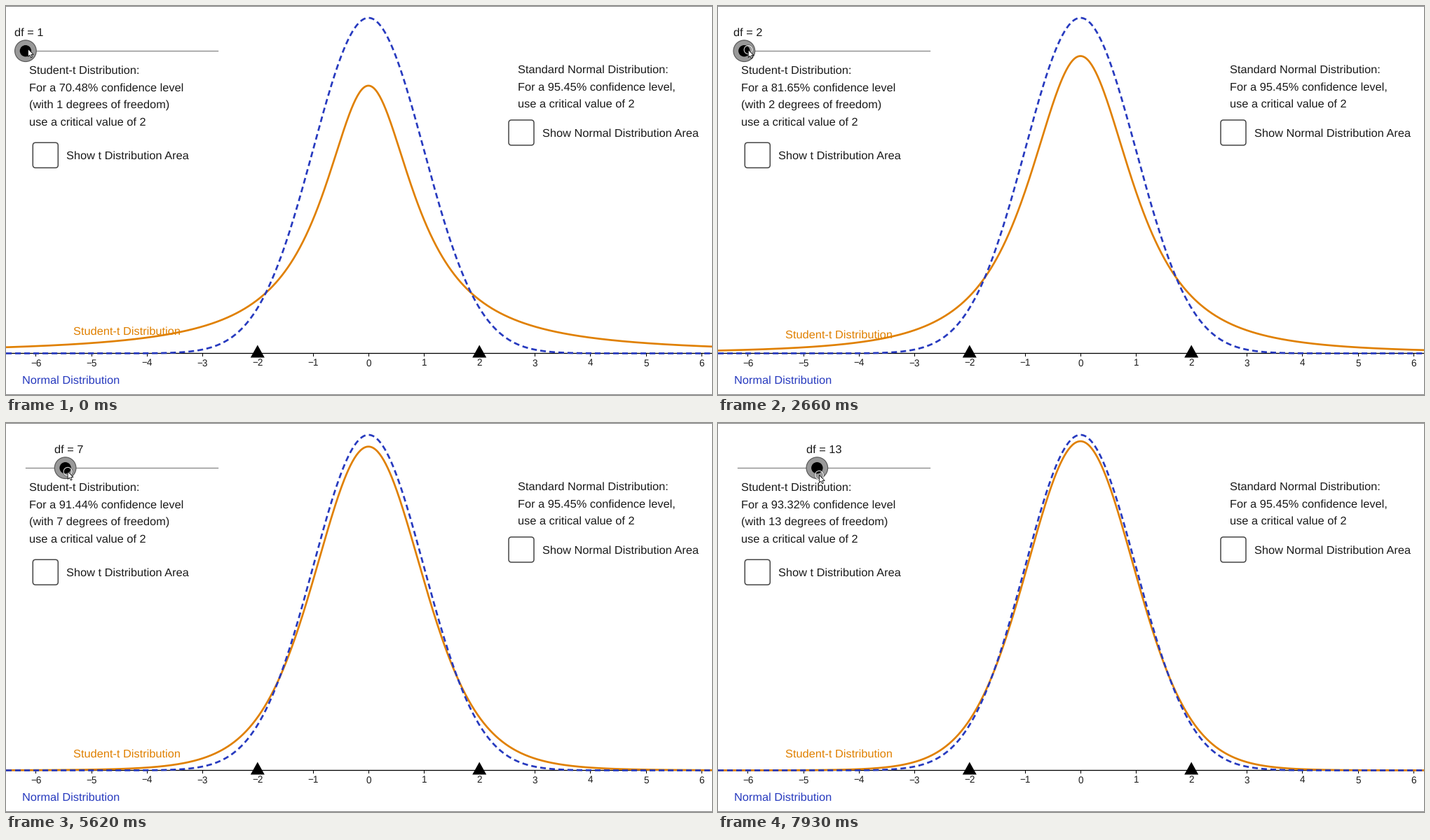
A matplotlib script for the animation above (8000 ms loop, 1007x556 px).

```python
import math

import numpy as np
import matplotlib.pyplot as plt
from matplotlib.animation import FuncAnimation
from matplotlib.patches import Circle, FancyBboxPatch, Polygon

W, H, DPI = 1007, 556, 72
LOOP, STEP = 8000, 40

X0, Y0 = 517.0, 496.5      # pixel position of the plot's zero point
UX, UY = 79.1, 1202.0      # pixels per unit
ORANGE, BLUE, INK = "#e08000", "#273abf", "#1a1a1a"

plt.rcParams["font.family"] = "Liberation Sans"
plt.rcParams["text.hinting"] = "no_hinting"
fig = plt.figure(figsize=((W + 0.01) / DPI, (H + 0.01) / DPI), dpi=DPI,
                 facecolor="white")
ax = fig.add_axes([0, 0, 1, 1])
ax.set_xlim(0, W)
ax.set_ylim(H, 0)
ax.axis("off")


def label(x, y, s, color=INK, size=16.35, **kw):
    return ax.text(x, y, s, color=color, fontsize=size, va="baseline", **kw)


def paragraph(x, y, lines):
    return [label(x, y + 24.5 * k, s) for k, s in enumerate(lines)]


def checkbox(x, y, text):
    ax.add_patch(FancyBboxPatch((x + 4, y + 4), 28, 28, fc="white", ec="#444444",
                                lw=1.5, boxstyle="round,pad=4,rounding_size=4"))
    label(x + 48, y + 23.5, text)


def normal_pdf(x):
    return np.exp(-x * x / 2) / math.sqrt(2 * math.pi)


def t_pdf(x, df):
    c = math.gamma((df + 1) / 2) / math.gamma(df / 2) / math.sqrt(df * math.pi)
    return c * (1 + x * x / df) ** (-(df + 1) / 2)


def confidence(df, crit=2, n=4000):
    mid = -crit + (np.arange(n) + 0.5) * 2 * crit / n
    return 100 * 2 * crit * t_pdf(mid, df).mean()


# Plot
px = np.linspace(0, W, 700)
xs = (px - X0) / UX

ax.plot([0, W], [Y0, Y0], color="black", lw=1.3, zorder=1)
for i in range(-6, 7):
    tx = X0 + i * UX
    ax.plot([tx, tx], [Y0, Y0 + 4], color="black", lw=1, zorder=1)
    label(tx + 0.3, 514.4, str(i).replace("-", "\u2212"), size=13.5, ha="center")
    if abs(i) == 2:
        ax.add_patch(Polygon([(tx - 10, 502.5), (tx + 10, 502.5), (tx, 484.5)],
                             fc="black", lw=0, zorder=4))

t_line, = ax.plot(px, px, color=ORANGE, lw=2.7, zorder=2)
ax.plot(px, Y0 - UY * normal_pdf(xs), color=BLUE, lw=2.7, zorder=3,
        ls=(0, (3, 1.82)), dash_capstyle="butt")

t_name = label(95.5, 469.5, "Student-t Distribution", ORANGE)
label(23, 540, "Normal Distribution", BLUE)

# Side texts
_, level, freedom, _ = paragraph(32.5, 97, ["Student-t Distribution:", "", "",
                                            "use a critical value of 2"])
checkbox(38.3, 195.3, "Show t Distribution Area")

paragraph(730, 96, ["Standard Normal Distribution:",
                    "For a 95.45% confidence level,",
                    "use a critical value of 2"])
checkbox(717, 163, "Show Normal Distribution Area")

for y in (0.5, H - 0.5):
    ax.plot([0, W], [y, y], color="#808080", lw=1, zorder=5)

# Slider and pointer
KNOB_X, KNOB_Y, NOTCH = 27.9, 64.2, 9.45
ax.plot([KNOB_X, KNOB_X + 29 * NOTCH], [KNOB_Y] * 2, color="#888888", lw=1.3,
        zorder=5)
knob = [Circle((0, 0), 15.3, fc="#999999", ec="#5a5a5a", lw=1.2, zorder=6),
        Circle((0, 0), 8.2, fc="black", lw=0, zorder=6)]
rings = [Circle((0, 0), 6.9, fill=False, ec="black", alpha=0.5, lw=0.7, zorder=7),
         Circle((0, 0), 6.0, fill=False, ec="white", alpha=0.85, lw=1.1, zorder=7)]
ARROW = np.array([(0, 0), (0, 11), (2.5, 8.7), (4.2, 12.4),
                  (6, 11.6), (4.4, 8), (7.8, 8)])
arrow = Polygon(ARROW, fc="white", ec="black", lw=0.8, zorder=8)
for p in (*knob, *rings, arrow):
    ax.add_patch(p)
df_text = label(0, 43, "")

# Pointer: pressed, then dragged through a few key points (ms, x, y)
PRESS = 1170
DRAG = np.array([(1800, 31, 61), (2010, 37.5, 62), (2940, 45, 62.3),
                 (3360, 54.5, 62.5), (4510, 72.5, 66), (5620, 87.5, 69),
                 (6900, 116, 73.5), (7930, 144, 74)])


def update(k):
    t = k * STEP + 30
    cx = np.interp(t, DRAG[:, 0], DRAG[:, 1])
    cy = np.interp(t, DRAG[:, 0], DRAG[:, 2])
    df = max(1, 2 + math.floor((cx - 35) / 9.35))

    t_line.set_ydata(Y0 - UY * t_pdf(xs, df))
    edge = UY * t_pdf(-6.5, df)
    t_name.set_y(min(472, round(472.9 - edge)) + 5.5)
    level.set_text(f"For a {confidence(df):.2f}% confidence level")
    freedom.set_text(f"(with {df} degrees of freedom)")

    kx = KNOB_X + NOTCH * (df - 1)
    for c in knob:
        c.center = kx, KNOB_Y
    df_text.set_text(f"df = {df}")
    df_text.set_x(kx - 15.7)
    for c in rings:
        c.center = cx + 0.4, cy + 0.4
        c.set_visible(t >= PRESS)
    arrow.set_xy(ARROW + (cx + 0.4, cy + 0.4))
    return []


anim = FuncAnimation(fig, update, frames=LOOP // STEP, interval=STEP,
                     repeat=True, repeat_delay=0, blit=False)
plt.show()
```
